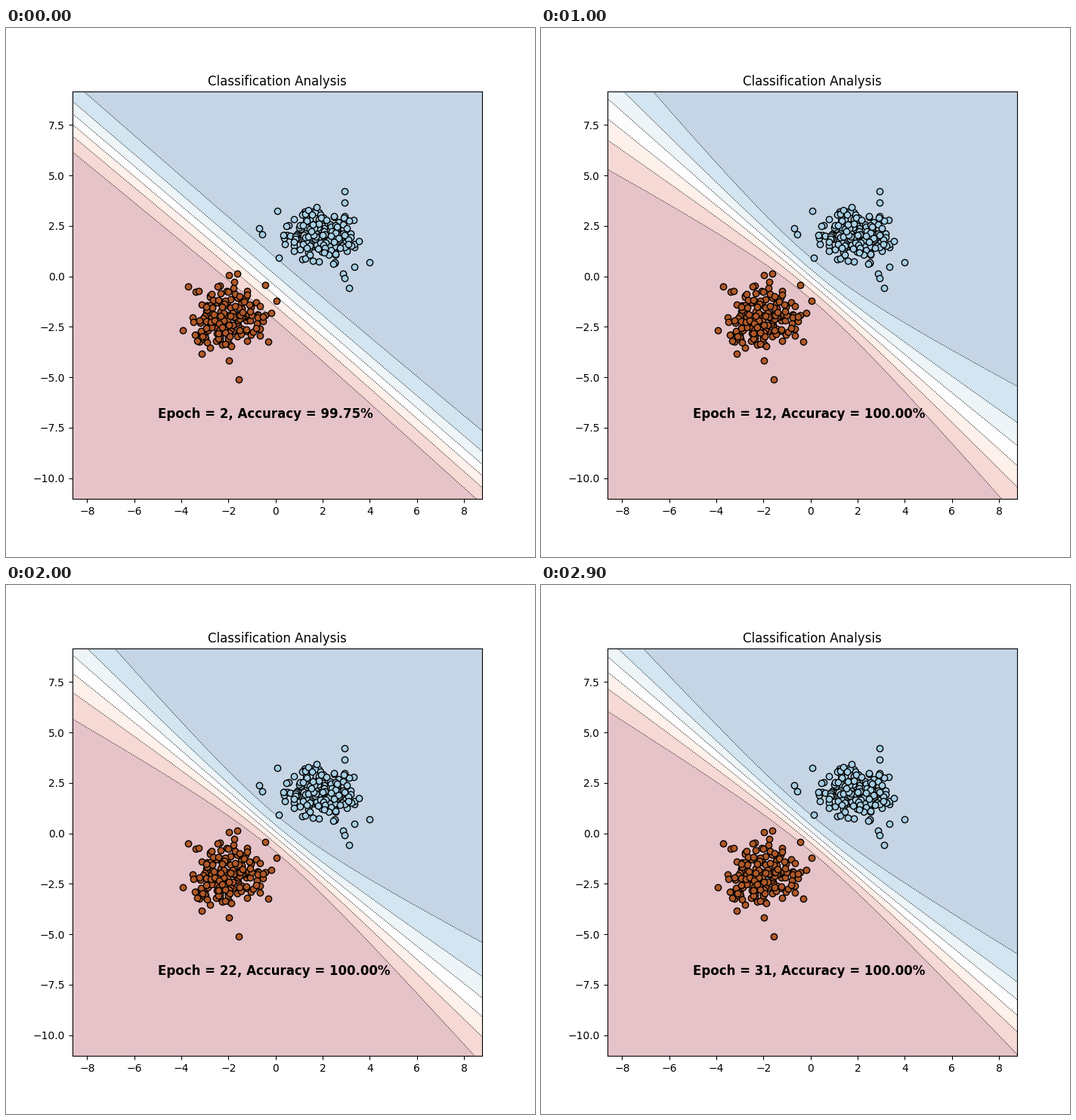
Write a matplotlib script that moves like this. It is 700 by 700 pixels and loops after 3000 ms.

```python
import matplotlib.pyplot as plt
import numpy as np
from matplotlib.animation import FuncAnimation

FRAMES, INTERVAL = 30, 100
FIRST_EPOCH = 2
X0, X_SCALE = 356.77, 31.16  # stage pixels of the data origin, pixels per unit
Y0, Y_SCALE = 328.63, 26.71
LEFT, MID, RIGHT = 88, 357, 630
TOP, BOTTOM = 84, 623
BEND = 100  # how far the contours take to straighten, in pixels

# Probability levels, as a share of the way from the red to the blue side.
levels = np.arange(1, 7) * 0.15
logits = np.log(levels / (1 - levels))
share = (logits - logits[0]) / (logits[-1] - logits[0])

# Heights where the outer contours meet the left and right edges.
EPOCHS = [2, 8, 12, 19, 24, 28, 31]
LEFT_RED = [164, 199, 187, 179, 176, 166, 167]
LEFT_BLUE = [71, 18, 15, 9, 30, 21, 34]
RIGHT_RED = [630, 653, 646, 652, 622, 636, 621]
RIGHT_BLUE = [533, 462, 474, 461, 481, 488, 488]

xs = np.linspace(LEFT - 4, RIGHT + 4, 240)


def to_data(x, y):
    return (np.asarray(x) - X0) / X_SCALE, (Y0 - np.asarray(y)) / Y_SCALE


def heights(epoch, red, blue):
    """Heights of all six contours, spread by their logits."""
    low, high = (np.interp(epoch, EPOCHS, t) for t in (red, blue))
    return low + (high - low) * share


def arc(u):
    return np.hypot(u, BEND) - BEND


def contours(epoch):
    """Hyperbolas through the left, middle and right heights."""
    left = heights(epoch, LEFT_RED, LEFT_BLUE)
    right = heights(epoch, RIGHT_RED, RIGHT_BLUE)
    narrow = 352 + 35 * np.exp((FIRST_EPOCH - epoch) / 6)
    mid = narrow + (304 - narrow) * share
    ends = np.array([LEFT, RIGHT]) - MID
    slope, bow = np.linalg.solve(np.column_stack([ends, arc(ends)]),
                                 [left - mid, right - mid])
    u = xs - MID
    for m, s, b in zip(mid, slope, bow):
        yield to_data(xs, m + s * u + b * arc(u))


rng = np.random.default_rng(4)


def cluster(center, spread, outliers):
    """200 samples: a normal cloud cut at 2.1 sigma, plus a few far ones."""
    cloud = rng.normal(size=(400, 2))
    cloud = cloud[np.hypot(*cloud.T) < 2.1] * spread + center
    pts = np.vstack([cloud[:200 - len(outliers)], outliers])
    return to_data(*pts.T)


brown = cluster((290, 383), (26, 23), [
    (308, 465), (295, 440), (259, 431), (241, 342), (234, 400), (347, 415),
    (351, 377), (358, 361), (343, 340), (306, 325), (295, 327)])
blue = cluster((418, 275), (25, 19), [
    (448, 216), (448, 231), (359, 242), (335, 265), (339, 273), (361, 304),
    (481, 310), (461, 316), (446, 325), (448, 331), (454, 344)])

fig, ax = plt.subplots(figsize=(7, 7), dpi=100)
ax.set_xlim(to_data([87.5, 630], 0)[0])
ax.set_ylim(to_data(0, [BOTTOM, TOP])[1])
ax.set_title("Classification Analysis")

# Seven translucent bands of RdBu, each painted over the one above it.
bands = 1 - 0.25 * (1 - plt.cm.RdBu((np.arange(7) * 2 + 1) / 14)[:, :3])
ax.set_facecolor(bands[6])
fills = [ax.fill([0], [0], color=bands[k], lw=0, zorder=1 - k / 10)[0]
         for k in range(6)]
lines = [ax.plot([], [], "k:", lw=0.7, zorder=1.5)[0] for _ in range(6)]
for pts, color in ((brown, plt.cm.Paired(11)), (blue, plt.cm.Paired(0))):
    ax.scatter(*pts, s=36, color=color, edgecolors="k", zorder=2)
label = ax.text(-5, -7, "", fontsize=12, fontweight="bold")

floor_x, floor_y = to_data([xs[-1], xs[0]], [1000, 1000])


def update(i):
    epoch = FIRST_EPOCH + i
    for (x, y), fill, line in zip(contours(epoch), fills, lines):
        line.set_data(x, y)
        fill.set_xy(np.column_stack([np.append(x, floor_x),
                                     np.append(y, floor_y)]))
    accuracy = 99.75 if epoch < 5 else 100
    label.set_text(f"Epoch = {epoch}, Accuracy = {accuracy:.2f}%")
    return [*fills, *lines, label]


anim = FuncAnimation(fig, update, frames=FRAMES, interval=INTERVAL,
                     repeat=True, repeat_delay=0)
plt.show()
```
